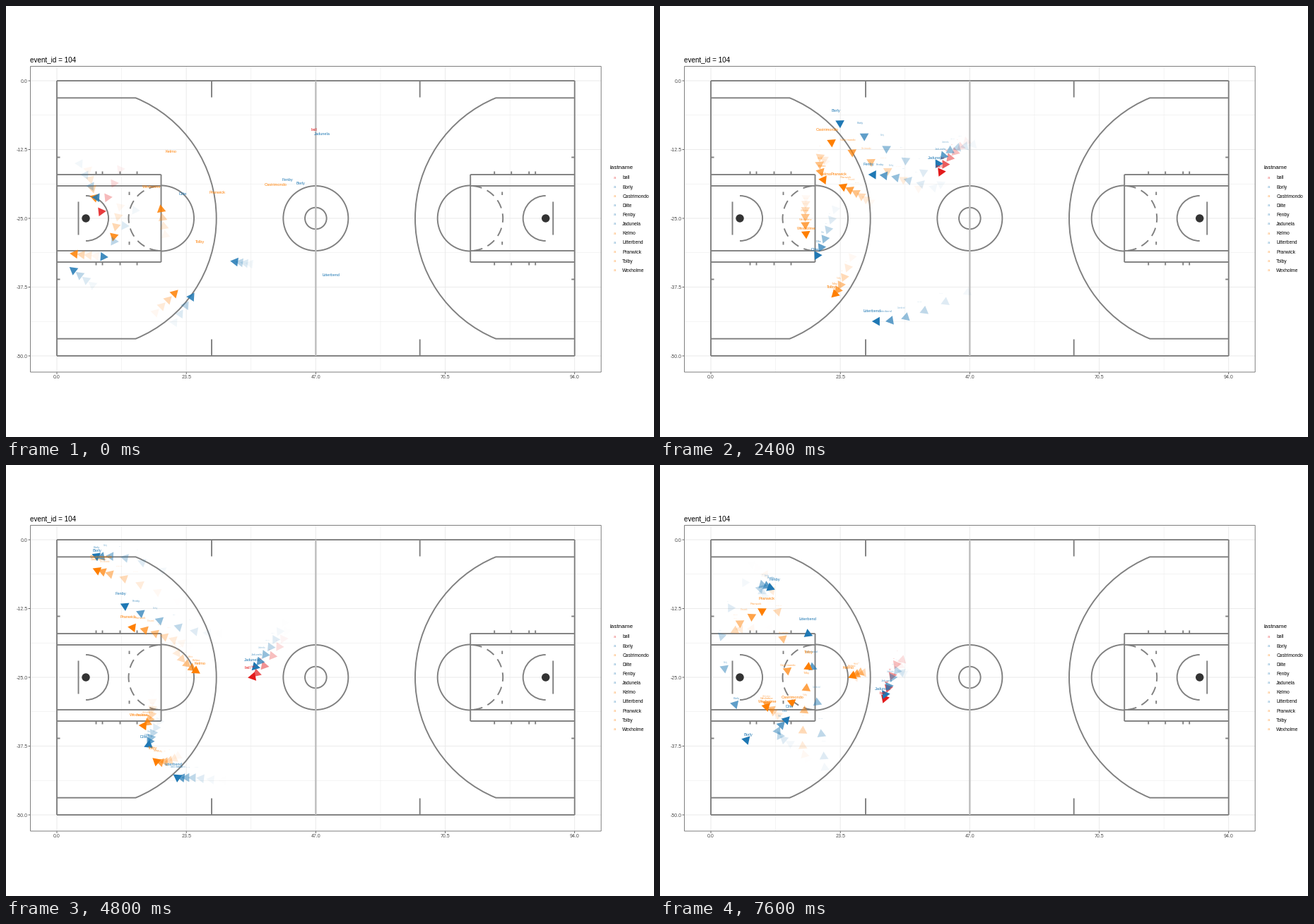
Animation of 917x611 px, one loop 8 s. Source, as a matplotlib script:

```python
import numpy as np
import matplotlib.pyplot as plt
from matplotlib.animation import FuncAnimation
from matplotlib.collections import PolyCollection
from matplotlib.patches import Arc, Circle

W, H, DPI = 917, 611, 100
FRAMES, STEP_MS = 20, 400
WAKE = 6.4
PT = 72 / DPI
BLUE, ORANGE, RED = "#1F78B4", "#FF7F00", "#E31A1C"
GRAY = "#7f7f7f"
LINE = 1.9

# Court geometry in pixels.
LEFT, TOP, RIGHT, BOTTOM = 71.5, 105.5, 804.2, 495.5
MID_X, MID_Y = (LEFT + RIGHT) / 2, (TOP + BOTTOM) / 2
HOOP_X, FREE_X = 112.5, 219

plt.rcParams["font.family"] = "Liberation Sans"
fig = plt.figure(figsize=(W / DPI, H / DPI), dpi=DPI, facecolor="white")
ax = fig.add_axes([0, 0, 1, 1])
ax.set(xlim=(-0.5, W - 0.5), ylim=(H - 0.5, -0.5))  # integers are pixel centres
ax.axis("off")


def line(x0, y0, x1, y1, color=GRAY, width=LINE, z=2):
    ax.plot([x0, x1], [y0, y1], color=color, lw=width * PT, zorder=z,
            solid_capstyle="butt", snap=False)


def box(x0, y0, x1, y1, **style):
    for y in (y0, y1):
        line(x0, y, x1, y, **style)
    for x in (x0, x1):
        line(x, y0, x, y1, **style)


def text(x, y, s, size, color="black", ha="left", alpha=1):
    return ax.text(x, y + size * 0.36, s, fontsize=size * PT, color=color,
                   ha=ha, va="baseline", alpha=alpha, zorder=6)


def arc(x, r, a0=0, a1=360, style="-"):
    ax.add_patch(Arc((x, MID_Y), 2 * r, 2 * r, theta1=a0, theta2=a1,
                     color=GRAY, lw=LINE * PT, ls=style, zorder=2))


def draw_panel():
    left, top, right, bottom = 34, 85, 841.7, 518.5
    dx, dy = (RIGHT - LEFT) / 4, (BOTTOM - TOP) / 4
    for i in range(5):
        x, y = LEFT + dx * i, TOP + dy * i
        if i < 4:
            line(x + dx / 2, top, x + dx / 2, bottom, "#ebebeb", 0.5, 0)
            line(left, y + dy / 2, right, y + dy / 2, "#ebebeb", 0.5, 0)
        line(x, top, x, bottom, "#ebebeb", 1, 0)
        line(left, y, right, y, "#ebebeb", 1, 0)
        line(x, bottom, x, bottom + 3, "#444444", 0.8)
        line(left - 3, y, left, y, "#444444", 0.8)
        text(x, 525, f"{23.5 * i:.1f}", 7, "#4d4d4d", "center")
        text(30, y, f"{0 - 12.5 * i:.1f}", 7, "#4d4d4d", "right")
    box(left, top, right, bottom, width=1, z=3)
    text(33.5, 75.5, "event_id = 104", 9.9)


def draw_half(mirror):
    def fx(x):
        return LEFT + RIGHT - x if mirror else x

    def seg(x0, dy0, x1, dy1):
        """Segment given by distances from the long axis, on both sides of it."""
        for side in (-1, 1):
            line(fx(x0), MID_Y + side * dy0, fx(x1), MID_Y + side * dy1)

    def half_arc(x, r, spread=90, style="-", inward=True):
        mid = 0 if inward != mirror else 180
        arc(fx(x), r, mid - spread, mid + spread, style)

    seg(LEFT, 170.7, 183, 170.7)
    seg(LEFT, 62, FREE_X, 62)
    seg(LEFT, 46, FREE_X, 46)
    seg(FREE_X, 0, FREE_X, 62)
    seg(102, 0, 102, 23.5)
    seg(LEFT, 86.5, 76, 86.5)
    seg(174, 33, 174, 37.5)
    seg(290.5, 171.5, 290.5, 195)
    for x in (127, 136, 161, 185):
        seg(x, 62, x, 66.5)
    half_arc(HOOP_X, 184.7, 67.7)
    half_arc(HOOP_X, 32)
    half_arc(FREE_X, 46.5)
    half_arc(FREE_X, 46, style=(8.7, (6.6, 4.2)), inward=False)
    ax.add_patch(Circle((fx(HOOP_X), MID_Y), 5.7, fc="#333333", lw=0, zorder=3))


def draw_court():
    box(LEFT, TOP, RIGHT, BOTTOM)
    for mirror in (False, True):
        draw_half(mirror)
    for r in (46, 15.3):
        arc(MID_X, r)
    line(MID_X, TOP, MID_X, BOTTOM, "#bebebe", 2.4, 3)


def smooth_path(knots):
    """Cubic Hermite curve through (step, x, y) knots, sampled at every step."""
    knots = np.array(knots, float)
    t, p = knots[:, 0], knots[:, 1:]
    m = np.gradient(p, t, axis=0)
    k = np.arange(FRAMES)
    i = np.clip(np.searchsorted(t, k, side="right") - 1, 0, len(t) - 2)
    h = (t[i + 1] - t[i])[:, None]
    u = (k - t[i])[:, None] / h
    return ((2 * u**3 - 3 * u**2 + 1) * p[i] + (u**3 - 2 * u**2 + u) * h * m[i]
            + (3 * u**2 - 2 * u**3) * p[i + 1] + (u**3 - u**2) * h * m[i + 1])


movers = []


def mover(name, color, *knots):
    movers.append((name, color, smooth_path(knots)))


# Turning points of each run.
mover("ball", RED, (0, 436, 189), (4, 405, 220), (8, 382, 263),
      (12, 342, 301), (14, 339, 277), (19, 315, 337))
mover("Borly", BLUE, (0, 416, 265), (4, 314, 198), (8, 186, 135),
      (11, 128, 131), (13, 130, 147), (16, 85, 249), (19, 124, 396))
mover("Castrimondo", ORANGE, (0, 381, 267), (4, 292, 217), (8, 183, 166),
      (11, 130, 148), (13, 144, 147), (16, 168, 214), (19, 187, 343))
mover("Dilte", BLUE, (0, 250, 280), (4, 230, 336), (8, 208, 378),
      (12, 195, 399), (16, 166, 377), (19, 183, 356))
mover("Fenby", BLUE, (0, 398, 260), (4, 327, 241), (8, 260, 234),
      (13, 148, 187), (15, 144, 172), (19, 162, 176))
mover("Jadunela", BLUE, (0, 447, 195), (4, 404, 208), (8, 377, 253),
      (13, 342, 294), (15, 335, 291), (19, 315, 331))
mover("Kelmo", ORANGE, (0, 233, 220), (2, 226, 213), (4, 226, 231),
      (8, 246, 272), (12, 274, 295), (16, 280, 295), (19, 266, 301))
mover("Litterbend", BLUE, (0, 459, 395), (4, 341, 443), (8, 269, 443),
      (13, 233, 431), (15, 231, 406), (19, 208, 232))
mover("Pranwick", ORANGE, (0, 298, 278), (4, 271, 261), (8, 230, 245),
      (12, 172, 229), (15, 106, 232), (19, 150, 203))
mover("Tolby", ORANGE, (0, 274, 348), (4, 252, 401), (7, 237, 416),
      (12, 207, 415), (15, 201, 391), (19, 210, 279))
mover("Wexholme", ORANGE, (0, 206, 270), (4, 205, 305), (8, 206, 352),
      (11, 194, 369), (17, 151, 343), (19, 152, 349))

# Where the previous play ended, and the step back along each wake.
LEFTOVERS = [
    (RED, (134, 291), (9, -20)), (ORANGE, (125, 271), (-3, -13)),
    (BLUE, (128, 271), (-8, -16)), (ORANGE, (219, 288), (2, 12)),
    (ORANGE, (152, 326), (3, -14)), (ORANGE, (97, 351), (10, 1)),
    (BLUE, (95, 374), (9, 7)), (BLUE, (137, 355), (15, -22)),
    (ORANGE, (238, 407), (-9, 9)), (BLUE, (262, 412), (-8, 12)),
    (BLUE, (324, 362), (7, 1)),
]


def draw_legend():
    text(854, 228, "lastname", 8.2)
    for i, (name, color, _) in enumerate(movers):
        y = 242.5 + 13.15 * i
        text(861.2, y - 0.3, "a", 5.6, color, "center", 0.65)
        text(871.7, y, name, 6.6)


def strength(age):
    return max(0, 1 - age / WAKE) ** 2


def heading(step):
    return step / max(np.hypot(*step), 1e-6)


def triangle(center, way):
    a = np.arctan2(way[1], way[0]) + np.arange(3) * 2 * np.pi / 3
    return center + 7.3 * np.column_stack([np.cos(a), np.sin(a)])


def leftover_shapes(k):
    for color, head, back in LEFTOVERS:
        back = np.array(back, float)
        for j in range(3, -1, -1):
            age = k + (j + 1.9 if j else 0.5)
            yield triangle(head + j * back, -back), color, strength(age)


def moving_shapes(k):
    for s in range(max(1, k - int(WAKE)), k + 1):
        for _, color, path in movers:
            way = heading(path[s] - path[s - 1])
            yield triangle(path[s] - 7 * way, way), color, strength(k - s)


live = []


def update(k):
    while live:
        live.pop().remove()
    verts, colors, alphas = zip(*leftover_shapes(k), *moving_shapes(k))
    live.append(ax.add_collection(PolyCollection(
        verts, facecolors=colors, alpha=list(alphas), linewidths=0, zorder=5)))
    for s in range(max(0, k - 4), k + 1):
        a = strength(k - s)
        for name, color, path in movers:
            x, y = path[s]
            live.append(text(x, y - 15, name, 5.65 * a, color, "center", a))
    return live


draw_panel()
draw_court()
draw_legend()
anim = FuncAnimation(fig, update, frames=FRAMES, init_func=lambda: live,
                     interval=STEP_MS, repeat=True, repeat_delay=0, blit=False)
plt.show()
```
